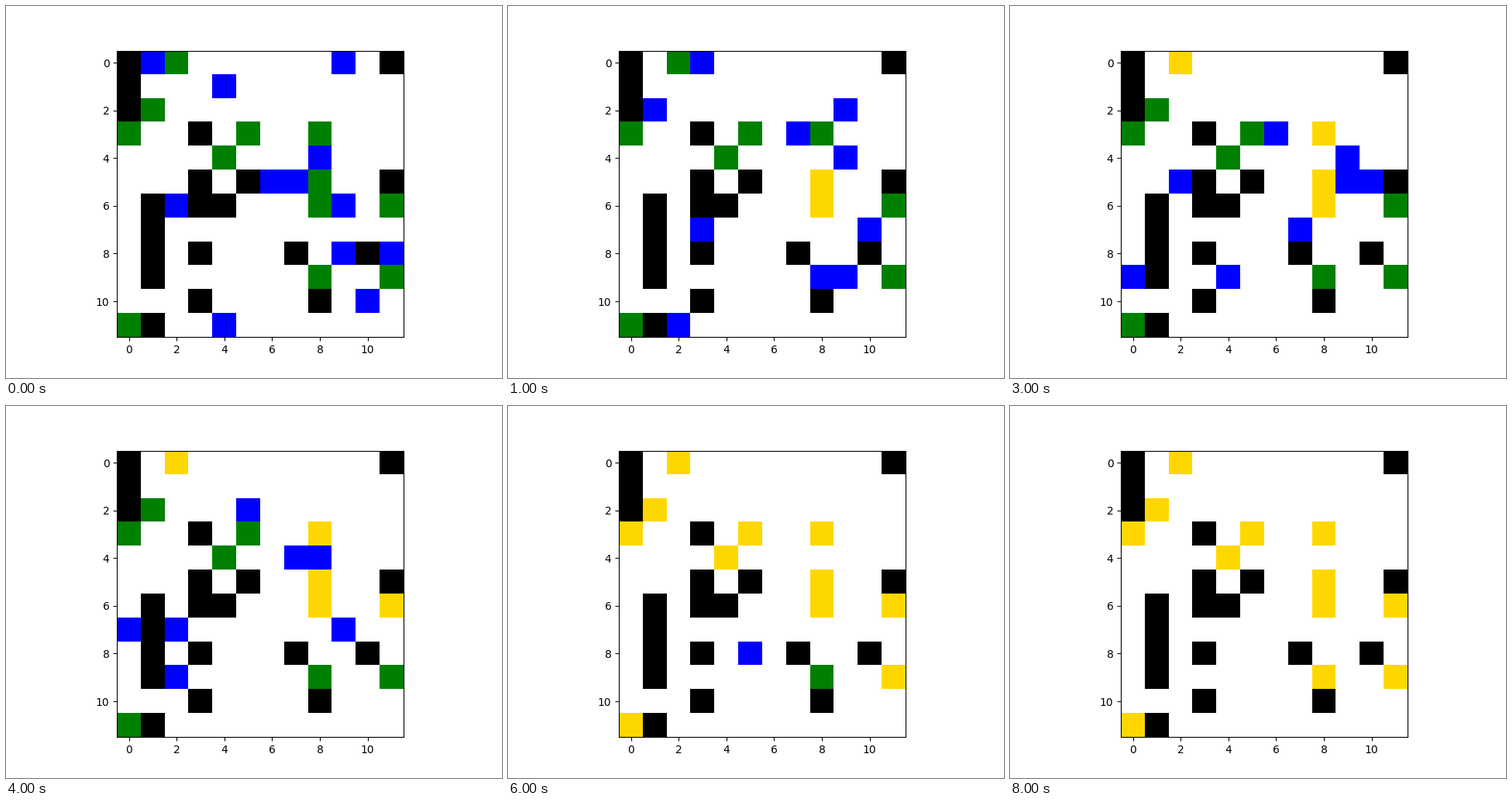
A matplotlib script for the animation above (8500 ms loop, 640 by 480 pixels).

```python
import numpy as np
import matplotlib.pyplot as plt
from matplotlib.animation import FuncAnimation
from matplotlib.colors import ListedColormap

FREE, WALL, GOAL, AGENT, DONE = range(5)
COLORS = ["white", "black", "green", "blue", "gold"]

MAP = """
#..........#
#...........
#...........
...#........
............
...#.#.....#
.#.##.......
.#..........
.#.#...#..#.
.#..........
...#....#...
.#..........
""".split()

# Start cell (row, column) and moves of each agent; its goal is where it ends.
ROUTES = [
    ((0, 1), "DDDRDDDDRRRDDRRR"),
    ((0, 9), "DDDRDDDR"),
    ((1, 4), "ULL"),
    ((4, 8), "DD"),
    ((5, 6), "RR"),
    ((5, 7), "UUR"),
    ((6, 2), "DRRRRRRRRRDD"),
    ((6, 9), "UULLLUULLLLL"),
    ((8, 9), "DLLLLLLLDLLD"),
    ((8, 11), "ULLUUULLLLU"),
    ((10, 10), "ULUUUUULLLLL"),
    ((11, 4), "LLULLUUUUUUU"),
]
STEPS = max(len(moves) for _, moves in ROUTES) + 1


def position(start, moves):
    row = start[0] + moves.count("D") - moves.count("U")
    col = start[1] + moves.count("R") - moves.count("L")
    return row, col


def grid_at(step):
    grid = np.array([[WALL if c == "#" else FREE for c in line] for line in MAP])
    for start, moves in ROUTES:
        grid[position(start, moves)] = GOAL
    for start, moves in ROUTES:
        state = DONE if step >= len(moves) else AGENT
        grid[position(start, moves[:step])] = state
    return grid


fig, ax = plt.subplots(figsize=(6.4, 4.8), dpi=100)
image = ax.imshow(grid_at(0), cmap=ListedColormap(COLORS),
                  vmin=-0.5, vmax=len(COLORS) - 0.5, interpolation="nearest")


def update(step):
    image.set_data(grid_at(step))
    return [image]


anim = FuncAnimation(fig, update, frames=STEPS, interval=500, repeat=True)
plt.show()
```
